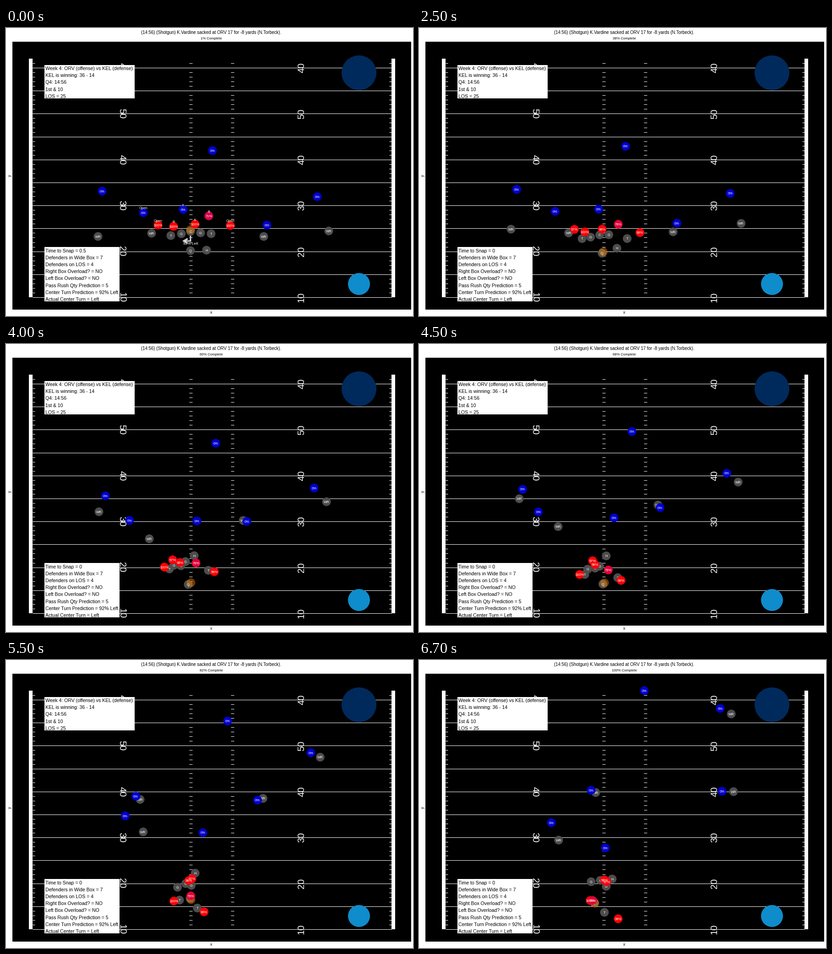
Write a matplotlib script that moves like this. It is 889 px wide and 630 px high and loops after 6800 ms.

```python
import numpy as np
import matplotlib.pyplot as plt
from matplotlib.animation import FuncAnimation
from matplotlib.collections import LineCollection
from matplotlib.patches import Circle, Rectangle

W, H, DPI = 889, 630, 64
PT = 72 / DPI                       # points per pixel
FRAMES, INTERVAL = 68, 100
SNAP, GO = 5, 15                    # ball snapped, play resumes
KEYS = (GO, 32, 40, 51, 60, 67)
YARD, GOAL_Y = 10.04, 589
GRAY, BALL = "#4d4d4d", "#ff8c00"
RADIUS = 9.5

plt.rcParams["font.family"] = "Liberation Sans"
fig = plt.figure(figsize=(W / DPI, H / DPI), dpi=DPI, facecolor="white")
ax = fig.add_axes([0, 0, 1, 1])
ax.set_xlim(0, W)
ax.set_ylim(H, 0)
ax.axis("off")


def rect(x0, y0, x1, y1, color, z):
    ax.add_patch(Rectangle((x0, y0), x1 - x0, y1 - y0, fc=color, ec="none", zorder=z))


def label(x, y, s, size, color="white", z=3, ha="center", rot=0):
    return ax.text(x, y, s, fontsize=size * PT, color=color, zorder=z, ha=ha,
                   va="baseline", rotation=rot, rotation_mode="anchor")


def dot(x, y, r, color, z, alpha=None):
    return ax.add_patch(Circle((x, y), r, fc=color, ec="none", alpha=alpha, zorder=z))


def arrow(pts, color, z, width=3, head=10):
    """Polyline ending in an open arrow head."""
    pts = np.array(pts, float)
    tip = pts[-1]
    back = np.arctan2(*(pts[-2] - tip)[::-1])
    wings = [tip + head * np.array([np.cos(a), np.sin(a)])
             for a in (back - np.pi / 6, back + np.pi / 6)]
    path = np.vstack([pts, wings[0], tip, wings[1]])
    return ax.plot(*path.T, color=color, lw=width * PT, zorder=z,
                   solid_joinstyle="miter", solid_capstyle="butt")[0]


def track(points, times, drift):
    """Positions per frame: pre-snap drift, a hold, then a monotone spline."""
    p = np.array(points, float)
    t = np.array(times, float)
    slope = np.diff(p, axis=0) / np.diff(t)[:, None]
    a, b = slope[:-1], slope[1:]
    same = a * b > 0
    m = np.zeros_like(p)
    m[1:-1] = np.where(same, 2 * a * b / np.where(same, a + b, 1), 0)
    m[-1] = slope[-1]
    out = np.empty((FRAMES, 2))
    for i in range(FRAMES):
        if i <= GO:
            out[i] = p[0] - np.array(drift) * max(0, 1 - i / SNAP)
            continue
        k = min(np.searchsorted(t, i, side="right") - 1, len(t) - 2)
        h = t[k + 1] - t[k]
        s = (i - t[k]) / h
        out[i] = (p[k] * (1 + 2 * s) * (1 - s) ** 2 + p[k + 1] * s * s * (3 - 2 * s)
                  + h * m[k] * s * (1 - s) ** 2 + h * m[k + 1] * s * s * (s - 1))
    return out


def rush_color(p):
    return (p ** 0.5, 0, 205 / 255 * (1 - p) ** 0.85)


# Field
rect(14, 30, 885, 616, "black", 0)
rect(50, 67, 58, 588.5, "white", 1)
rect(842, 67, 850, 588.5, "white", 1)
lines = [[(58, y), (842, y)] for y in GOAL_Y - 5 * YARD * np.arange(11)]
for y in GOAL_Y - YARD * np.arange(1, 52):
    lines += [[(x, y), (x + w, y)] for x, w in ((58, 5), (400, 7), (491, 7), (837, 5))]
ax.add_collection(LineCollection(lines, colors="white", linewidths=PT, zorder=1))
for k, num in enumerate((10, 20, 30, 40, 50, 40)):
    y = GOAL_Y - 10 * YARD * k
    label(247.5, y, num, 20, z=2, rot=-90)
    label(651, y, num, 20, z=2, rot=90)

# Team badges
dot(771, 98, 38, "#002a5c", 2)
dot(771, 560, 24, "#0f8ccb", 2)

# Titles and axis names
label(448, 13, "(14:56) (Shotgun) K.Vardine sacked at ORV 17 for -8 yards (N.Torbeck).",
      9.62, "black")
progress = label(448.5, 25, "", 7.75, "black")
label(448.5, 625, "x", 9, "black")
label(11, 323, "y", 9, "black", rot=90)


def info_box(x1, y0, y1, rows):
    rect(84, y0, x1, y1, "white", 3)
    return [label(86, y0 + 11.3 + 15.2 * k, s, 10.56, "black", 4, "left")
            for k, s in enumerate(rows)]


info_box(281, 80.8, 154, ["Week 4: ORV (offense) vs KEL (defense)", "KEL is winning: 36 - 14",
                          "Q4: 14:56", "1st & 10", "LOS = 25"])
rows = info_box(248, 479.3, 598, ["", "Defenders in Wide Box = 7", "Defenders on LOS = 4",
                                  "Right Box Overload? = NO", "Left Box Overload? = NO",
                                  "Pass Rush Qty Prediction = 5", "",
                                  "Actual Center Turn = Left"])

players = []


def offense(name, *pts, drift=(0, 0)):
    players.append(dict(path=track(pts, KEYS, drift), dot=dot(0, 0, RADIUS, GRAY, 5),
                        text=label(0, 0, name, 7.5, z=6)))


def defense(*pts, drift=(0, 0), gap="", rush=(0, 0)):
    players.append(dict(path=track(pts, KEYS, drift), dot=dot(0, 0, RADIUS, "blue", 8),
                        text=label(0, 0, "", 7.6, z=9),
                        gap=label(0, 0, gap, 7.8, z=9), rush=rush))


offense("WR", (201, 455), (201, 419), (203, 367), (257, 313), (342, 298), (386, 290),
        drift=(0, -1))
offense("WR", (318, 449), (332, 447), (313, 426), (298, 376), (303, 376), (305, 394))
offense("WR", (564, 456), (543, 431), (518, 386), (535, 317), (613, 292), (687, 288),
        drift=(1, 0))
offense("WR", (705, 444), (702, 404), (700, 345), (692, 248), (681, 170), (682, 118))
offense("T", (360, 454), (354, 470), (357, 492), (371, 517), (386, 531), (381, 528))
offense("G", (382, 451), (369, 466), (367, 484), (372, 498), (377, 494), (376, 485),
        drift=(-1, 1))
offense("C", (403, 445), (387, 463), (382, 485), (390, 493), (395, 483), (396, 482))
offense("G", (424, 449), (404, 457), (392, 476), (400, 493), (409, 493), (409, 495),
        drift=(-1, 1))
offense("T", (449, 451), (458, 473), (442, 495), (425, 530), (410, 552), (405, 552),
        drift=(1, 1))
offense("Q", (403, 487), (398, 501), (398, 526), (406, 523), (393, 520), (383, 531))
offense("H", (438, 486), (425, 476), (411, 463), (408, 465), (421, 469), (422, 479))

# Pass rush
defense((333, 430), (348, 453), (364, 472), (397, 476), (412, 482), (410, 485),
        drift=(1, -1), gap="Open", rush=(100, 97))
defense((366, 434), (357, 461), (346, 488), (361, 520), (372, 532), (374, 526),
        gap="B", rush=(100, 100))
defense((413, 430), (388, 453), (380, 478), (394, 485), (404, 479), (405, 481),
        drift=(0, 1), gap="A", rush=(100, 98))
defense((441, 412), (428, 450), (415, 479), (412, 509), (389, 522), (379, 526),
        drift=(-2, 1), gap="B", rush=(71, 79))
defense((490, 432), (473, 467), (455, 498), (431, 538), (435, 562), (435, 566),
        gap="Open", rush=(100, 99))

# Coverage
defense((210, 355), (216, 350), (217, 332), (251, 303), (333, 293), (376, 285),
        drift=(0, -2))
defense((300, 403), (293, 398), (270, 386), (255, 346), (273, 338), (289, 356),
        drift=(0, -1), gap="Open")
defense((388, 397), (399, 395), (417, 387), (432, 375), (424, 386), (407, 411),
        drift=(1, 0), gap="A")
defense((450, 267), (453, 247), (458, 217), (476, 157), (491, 104), (492, 67),
        drift=(-1, -1))
defense((570, 430), (554, 422), (526, 388), (529, 323), (596, 293), (662, 287),
        drift=(0, -1))
defense((681, 369), (678, 351), (673, 315), (672, 237), (658, 159), (658, 106),
        drift=(1, 0))

ball = dot(0, 0, RADIUS, BALL, 5.5, 0.42)
ball_path = track([(403, 438), (402, 487), (403, 491), (404, 497), (404, 522), (407, 523),
                   (397, 527), (384, 532)], (GO, 22, 27) + KEYS[1:], (0, -3))

# Predicted turn before the snap, assignments while the play is held
turn_arrow = arrow([(403, 450), (403, 466), (388, 466)], "lightgray", 4)
turn_text = label(403.5, 474, "", 8.2, z=6)
plan = []
for x, y in ((360, 454), (382, 451), (403, 445), (424, 449)):
    plan.append(arrow([(x, y), (x, y + 25.5), (x - 22, y + 25.5)], "dodgerblue", 4))
plan.append(arrow([(449, 451), (449, 476), (472, 476)], "forestgreen", 4))
for start, tip in (((333, 430), (351, 458)), ((366, 434), (357, 466)),
                   ((413, 430), (386, 457)), ((441, 412), (427, 454)),
                   ((490, 432), (471, 472))):
    plan.append(arrow([start, tip], "red", 7))


def update(i):
    pre = min(i / SNAP, 1)
    turn = 93 if 0 < i < 4 else 92
    progress.set_text(f"{round(100 * (i + 1) / FRAMES)}% Complete")
    rows[0].set_text(f"Time to Snap = {max(0, SNAP - i) / 10:g}")
    rows[6].set_text(f"Center Turn Prediction = {turn}% Left")
    turn_text.set_text(f"{turn}% Left")
    for art in (turn_arrow, turn_text):
        art.set_visible(i < SNAP)
    for art in plan:
        art.set_visible(SNAP <= i <= GO)
    for pl in players:
        x, y = pl["path"][i]
        pl["dot"].center = x, y
        pl["text"].set_position((x, y + 2.7))
        if "rush" in pl:
            first, last = pl["rush"]
            pct = first + (last - first) * pre
            pl["dot"].set_facecolor(rush_color(pct / 100))
            pl["text"].set_text(f"{round(pct)}%")
            pl["gap"].set_position((x, y - 7.5))
            pl["gap"].set_visible(i <= GO)
    ball.center = tuple(ball_path[i])
    return []


anim = FuncAnimation(fig, update, frames=FRAMES, interval=INTERVAL, repeat=True,
                     repeat_delay=0, blit=False)
plt.show()
```
